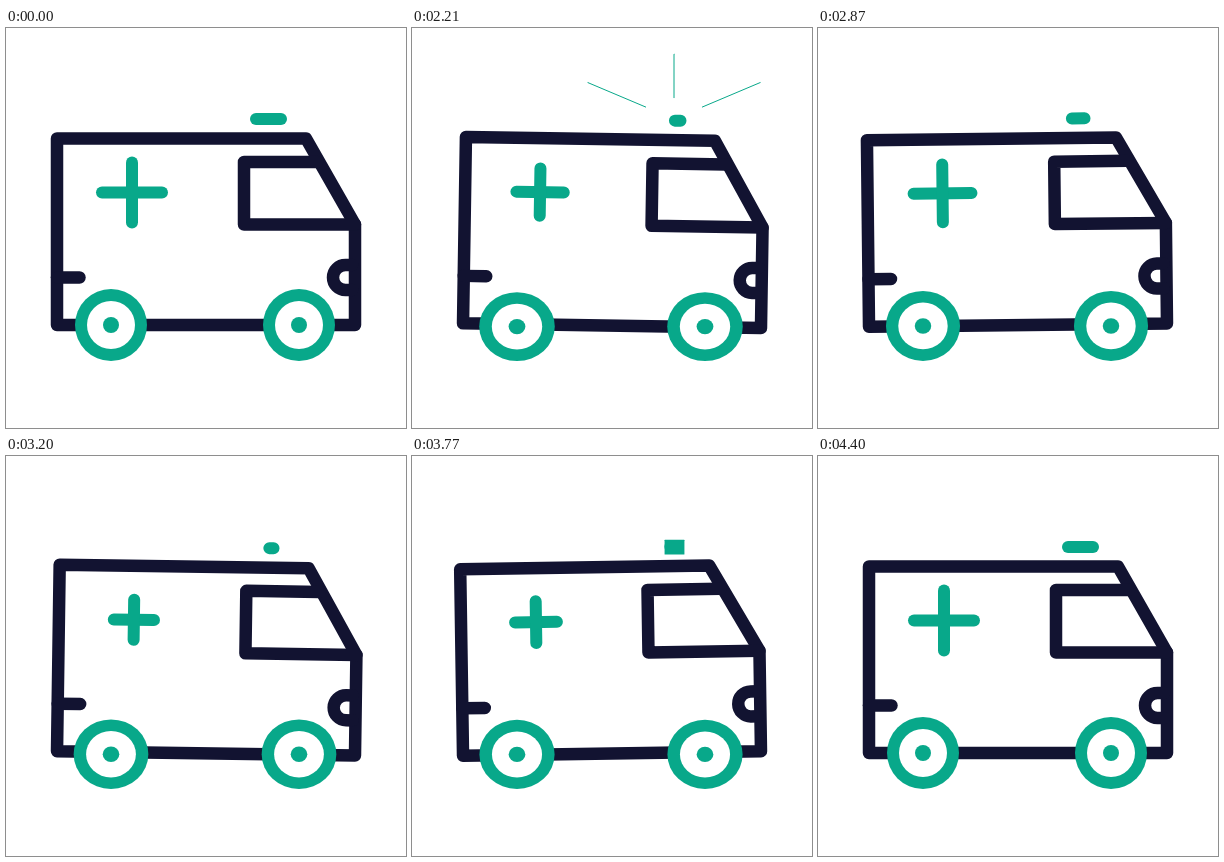
Write an HTML page with a canvas that moves like this. It is 400 px wide and 400 px high and loops after 4430 ms.

```html
<!DOCTYPE html>
<html lang="en">
<head>
<meta charset="utf-8">
<title>Ambulance</title>
<style>
html, body { margin: 0; width: 100%; height: 100%; overflow: hidden; background: #fff; }
canvas { display: block; width: 400px; height: 400px; }
</style>
</head>
<body>
<canvas id="stage" width="400" height="400"></canvas>
<script>
const ctx = document.getElementById('stage').getContext('2d');
const DARK = '#121331', GREEN = '#08a88a';
const LOOP = 4430, HOLD = 2030, STEP = 30, LAST = 80, PULSE = 18;

const clamp = u => Math.max(0, Math.min(1, u));
const smooth = u => (1 - Math.cos(Math.PI * clamp(u))) / 2;
const mix = (a, b, u) => a + (b - a) * u;
// Cosine over a number of steps, highest at the given step
const wave = (k, period, peak) => Math.cos(2 * Math.PI * (k - peak) / period);

function pose(k) {
  const phase = k % PULSE;
  const active = smooth((k - 1) / 5) * smooth((LAST - k) / 12);
  const bounce = (1 + wave(k, PULSE, 7)) / 2;
  const beating = k > 0 && k < 4 * PULSE;
  const dash = phase < 5 ? mix(12.5, 1, smooth(phase / 5)) : mix(1, 12.5, (phase - 5) / 13);
  return {
    tilt: -0.9 * active * wave(k, 2 * PULSE, 24.5),
    lift: active * (1.6 * bounce - 0.9),
    squash: active * bounce,
    cross: mix(30, 24.5 - 4.7 * wave(k, PULSE, 3), active),
    dash: beating ? dash : 12.5,
    flare: beating ? phase - 5 : -1,
    spark: beating && (k === 1 || phase === 5)
  };
}

function line(color, points, closed) {
  ctx.strokeStyle = color;
  ctx.beginPath();
  points.forEach(([x, y]) => ctx.lineTo(x, y));
  if (closed) ctx.closePath();
  ctx.stroke();
}

function drawBody({ tilt, lift, cross, dash }) {
  ctx.save();
  ctx.translate(200, 297 + lift);
  ctx.rotate(tilt * Math.PI / 180);
  ctx.translate(-200, -297);

  ctx.lineWidth = 12.5;
  line(DARK, [[51, 110.5], [300, 110.5], [349, 196.5], [349, 297], [51, 297]], true);
  line(DARK, [[311, 134], [238, 134], [238, 196.5], [349, 196.5]]);
  line(DARK, [[51, 249.5], [73.5, 249.5]]);
  ctx.beginPath();
  ctx.moveTo(346, 237);
  ctx.arc(339.5, 249.5, 12.5, -Math.PI / 2, Math.PI / 2, true);
  ctx.lineTo(346, 262);
  ctx.stroke();

  ctx.lineWidth = 12;
  line(GREEN, [[126 - cross, 164.5], [126 + cross, 164.5]]);
  line(GREEN, [[126, 164.5 - cross], [126, 164.5 + cross]]);
  line(GREEN, [[262.5 - dash, 91], [262.5 + dash, 91]]);
  ctx.restore();
}

function drawSpark(dash) {
  const w = 18.5 + 1.35 * dash, h = 14 + 0.7 * dash;
  ctx.fillStyle = GREEN;
  ctx.beginPath();
  ctx.roundRect(262.5 - w / 2, 91.2 - h / 2, w, h, dash / 3);
  ctx.fill();
}

function drawRays(flare) {
  if (flare < 1 || flare > 5) return;
  const head = 1 - (1 - clamp(flare / 3)) ** 2;
  const tail = smooth(flare / 5.5);
  for (const side of [-1, 0, 1]) {
    const dx = 97 * side, dy = side ? -41 : -73;
    line(GREEN, [head, tail].map(u => [262 + dx * u, 91 + dy * u]));
  }
}

function drawWheel(x, squash) {
  const disc = radius => {
    ctx.beginPath();
    ctx.arc(0, -36, radius, 0, 2 * Math.PI);
    ctx.fill();
  };
  ctx.save();
  ctx.translate(x, 333);
  ctx.scale(1 + 0.05 * squash, 1 - 0.045 * squash);
  [[GREEN, 36], ['#fff', 24], [GREEN, 8]].forEach(([color, radius]) => {
    ctx.fillStyle = color;
    disc(radius);
  });
  ctx.restore();
}

function draw(ms) {
  const t = ms % LOOP;
  const k = t < HOLD ? 0 : Math.min(LAST, Math.floor((t - HOLD) / STEP) + 1);
  const now = pose(k);
  ctx.fillStyle = '#fff';
  ctx.fillRect(0, 0, 400, 400);
  ctx.lineCap = ctx.lineJoin = 'round';
  drawBody(now);
  if (now.spark) drawSpark(now.dash);
  drawRays(now.flare);
  for (const x of [105, 293]) drawWheel(x, now.squash);
}

const start = performance.now();
function tick() {
  draw(performance.now() - start);
  requestAnimationFrame(tick);
}
tick();
</script>
</body>
</html>
```
